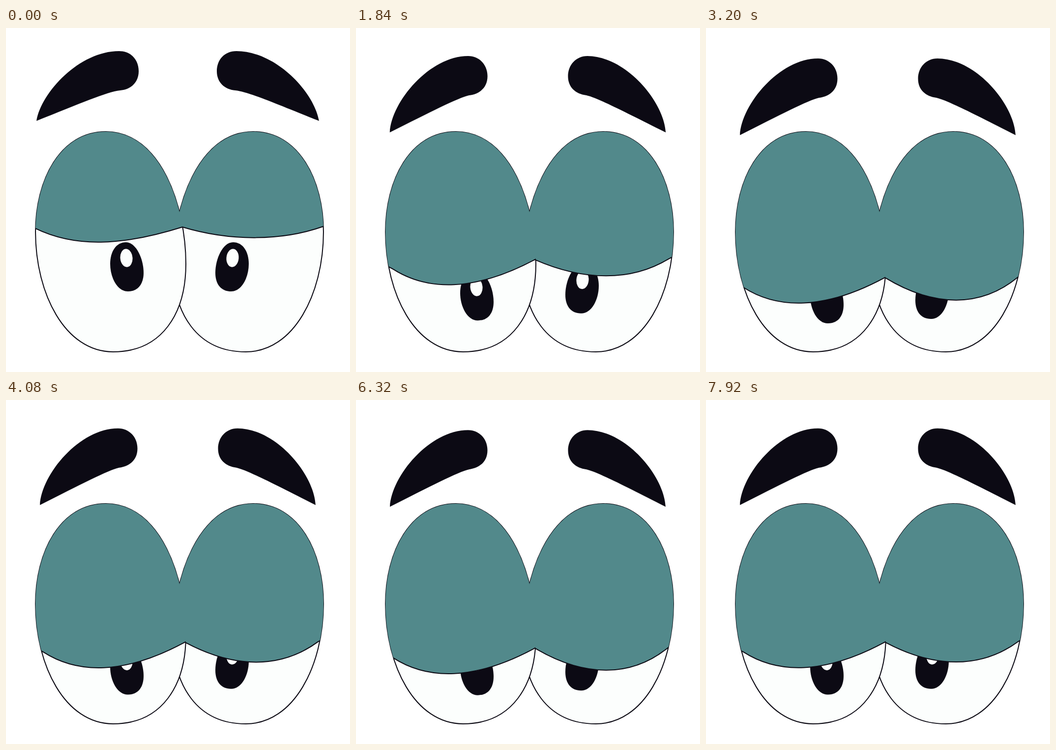
An HTML page that plays this animation: 700x700 px, repeating every 8000 ms.

```html
<!DOCTYPE html>
<html lang="en">
<head>
<meta charset="utf-8">
<title>Sad eyes</title>
<style>
  html, body { margin: 0; width: 100%; height: 100%; overflow: hidden; background: #fff; }
  svg { display: block; width: 100vw; height: 100vh; }
  .eye { fill: #fcfefd; stroke: #0c0a14; stroke-width: 2; }
  .dark { fill: #0c0a14; }
  .lid { fill: #52898b; stroke: #0c0a14; stroke-width: 2; }
</style>
</head>
<body>
<svg viewBox="0 0 700 700">
  <defs>
    <path id="eye" d="M203 211C110 211 60 310 60 415C60 540 120 659 218 659C318 659 366 580 366 480C366 365 316 211 203 211Z"/>
    <g id="pupil">
      <path class="dark" d="M244 436C265 436 280 470 280 498C280 522 268 536 248 536C226 536 212 507 212 480C212 455 224 436 244 436Z"/>
      <ellipse cx="245" cy="468" rx="12.5" ry="18.5" fill="#fcfefd" transform="rotate(-5 245 468)"/>
    </g>
    <path id="brow" class="dark"/>
    <clipPath id="clipL"><use href="#eye"/></clipPath>
    <clipPath id="clipR"><use href="#eye" transform="matrix(-1 0 0 1 706 0)"/></clipPath>
  </defs>
  <use href="#brow"/>
  <use href="#brow" transform="matrix(-1 0 0 1 699 0)"/>
  <g transform="matrix(-1 0 0 1 706 0)">
    <use href="#eye" class="eye"/>
    <use href="#pupil" id="pupilR"/>
  </g>
  <use href="#eye" class="eye"/>
  <use href="#pupil" id="pupilL"/>
  <g clip-path="url(#clipR)"><path id="lidR" class="lid"/></g>
  <g clip-path="url(#clipL)"><path id="lidL" class="lid"/></g>
</svg>
<script>
const LOOP = 8000, DROP = 2160;
const get = id => document.getElementById(id);

// Poses: [raised, lowered], each a start point followed by cubic segments
const brow = [
  [62,189, 72,130,150,47,230,47, 255,47,270,65,270,88, 270,110,255,125,232,127, 205,130,150,154,62,189],
  [69,218, 72,155,150,62,228,62, 251,62,267.5,80,267.5,103, 267.5,126,252,139,230,142, 208,147,150,177,69,218]
];
const lidL = [[60,408, 140,447,235,444,359,405], [76,528, 145,572.5,240,575,364,508]];
const lidR = [[359,405, 455,434,560,434,645,404], [364,508, 465,569.5,560,569.5,635,507]];

// Slow bob after the drop: [time, lift]
const bobKeys = [[2160,1], [2420,1], [3140,0], [3950,1], [4800,0], [5680,1], [6580,0], [7800,1], [8700,0]];

const lerp = (a, b, k) => a + (b - a) * k;
const clamp = x => Math.min(1, Math.max(0, x));
const sine = u => (1 - Math.cos(Math.PI * clamp(u))) / 2;

// cubic-bezier(.8, 0, .5, 1)
function dropEase(x) {
  let lo = 0, hi = 1, s = 0.5;
  for (let i = 0; i < 24; i++) {
    s = (lo + hi) / 2;
    const bx = 2.4 * (1 - s) ** 2 * s + 1.5 * (1 - s) * s * s + s ** 3;
    if (bx < x) lo = s; else hi = s;
  }
  return s * s * (3 - 2 * s);
}

function bobAt(t) {
  const i = bobKeys.findIndex(key => key[0] > t);
  const [t0, a] = bobKeys[i - 1], [t1, b] = bobKeys[i];
  return lerp(a, b, sine((t - t0) / (t1 - t0)));
}

const blend = (pose, k) => pose[0].map((v, i) => lerp(v, pose[1][i], k));

function curve(p) {
  return `M${p[0]} ${p[1]}C${p.slice(2).join(" ")}`;
}

function lidPath(pose, k, dy, sag) {
  const p = blend(pose, k).map((v, i) => i % 2 ? v + dy * (i === 3 || i === 5 ? sag : 1) : v);
  const [x0, y0] = p, [x1, y1] = p.slice(-2);
  return `M${x0 - 30} 150V${y0 - 16}L${curve(p).slice(1)}L${x1 + 30} ${y1 - 16}V150Z`;
}

function draw(t) {
  const drop = t < DROP ? dropEase(t / DROP) : 1;
  const bob = t < DROP ? drop : bobAt(t);
  const lag = 1 - sine((t - 2400) / 800);
  const dy = -(16 + 18 * lag) * bob;

  get("brow").setAttribute("d", curve(blend(brow, drop)) + "Z");
  get("brow").setAttribute("transform", `translate(0 ${-4.5 * bob})`);
  get("lidL").setAttribute("d", lidPath(lidL, drop, dy, 1));
  get("lidR").setAttribute("d", lidPath(lidR, drop, dy, 1.49));
  get("pupilL").setAttribute("transform", `translate(0 ${65 * drop + 0.1 * dy})`);
  get("pupilR").setAttribute("transform", `translate(0 ${56 * drop + 0.28 * dy})`);
}

const start = performance.now();
function tick() {
  draw((performance.now() - start) % LOOP);
  requestAnimationFrame(tick);
}
draw(0);
requestAnimationFrame(tick);
</script>
</body>
</html>
```
